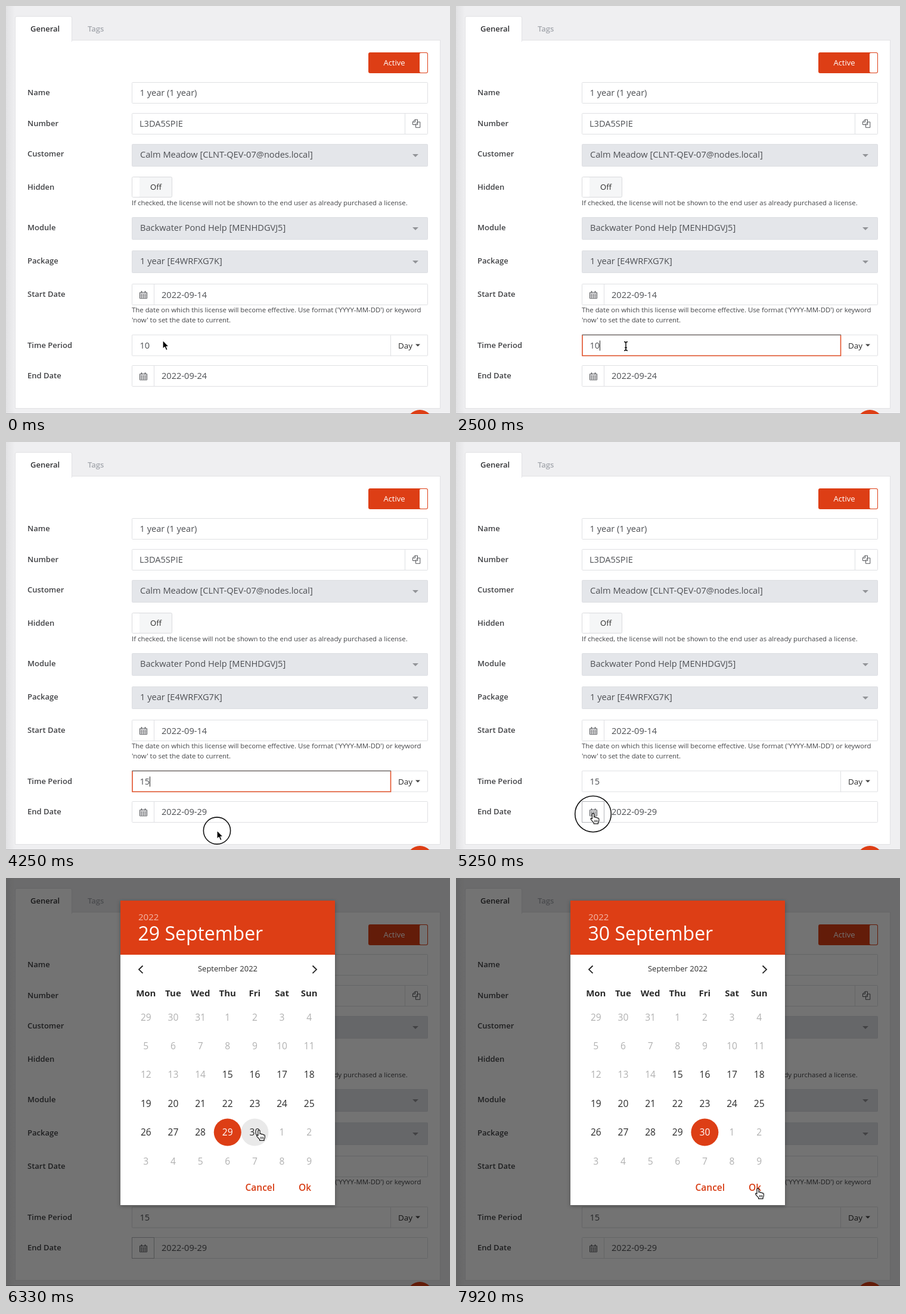
Recreate the animation shown at these times as an HTML page. Size 745 by 686 pixels, loop 8 s.

```html
<!DOCTYPE html>
<html lang="en">
<head>
<meta charset="utf-8">
<title>License form</title>
<style>
html, body { margin: 0; width: 100%; height: 100%; overflow: hidden; background: #efeff1; }
svg { display: block; width: 745px; height: 686px; }
text { font-family: "Open Sans", "Noto Sans", sans-serif; white-space: pre; }
.label { font-size: 13px; font-weight: 600; fill: #414245; }
.value { font-size: 14.6px; fill: #4d4f53; }
.help { font-size: 11.4px; fill: #444548; }
.small { font-size: 13px; fill: #2c2c2c; }
.week { font-size: 15px; font-weight: 700; fill: #2c2c2c; text-anchor: middle; }
.day { font-size: 15.6px; text-anchor: middle; }
.action { font-size: 15.5px; font-weight: 600; fill: #d73c14; }
.box { fill: #fff; stroke: #dfe0e3; }
.select { fill: #e4e6ea; stroke: #dcdee2; }
.line { fill: none; stroke: #dfe0e3; }
.dialog { filter: drop-shadow(0 2px 3px rgba(0, 0, 0, .3)); }
</style>
</head>
<body>
<svg id="stage" viewBox="0 0 745 686"></svg>
<script>
const ORANGE = '#dd3e15';
const LOOP = 8000, STEP = 250 / 3;

const text = (x, y, str, cls, extra = '') => `<text x="${x}" y="${y}" class="${cls}" ${extra}>${str}</text>`;
const rect = (x, y, w, h, attrs) => `<rect x="${x}" y="${y}" width="${w}" height="${h}" ${attrs}/>`;
const path = (d, attrs) => `<path d="${d}" ${attrs}/>`;
const at = (x, y, body, attrs = '') => `<g transform="translate(${x} ${y})" ${attrs}>${body}</g>`;
const label = (y, str) => text(36, y, str, 'label');
const field = (y, inner = '') => rect(211.5, y + .5, 496, 35, 'rx="1" class="box"') + inner;
const divider = (x, y) => path(`M${x} ${y + 1}v35`, 'class="line"');
const caret = (x, y, w, color) => path(`M${x - w / 2} ${y}h${w}l${-w / 2} ${w / 2}z`, `fill="${color}"`);
const select = (y, str) => rect(211.5, y + .5, 496, 37, 'rx="1" class="select"') +
  text(225, y + 23.4, str, 'value') + caret(687, y + 17, 10, '#929498');

const calendarIcon = (x, y) => at(x, y,
  path('M.5 3.200h12v10H.5z', '') +
  path('M.5 5.600h12M.5 8.100h12M.5 10.600h12M3.500 5.600v7.600M6.500 5.600v7.600M9.500 5.600v7.600', 'stroke-width=".7"') +
  path('M3.500 .800v3M9.500 .800v3', 'stroke-width="1.600"'), 'fill="none" stroke="#56585c"');
const copyIcon = at(682, 190.5,
  path('M4.5 .5h4v8.5h-8v-5zM4.5 .5v4h-4M8.5 4.5h4.3v9.3h-7.3v-4.8M8.5 4.8l-3 3.2', ''),
  'fill="none" stroke="#55575b" stroke-linejoin="round"');
const dateField = y => field(y, divider(248.5, y) + calendarIcon(224, y + 11.5));

const form = `
  <defs><linearGradient id="shade"><stop stop-color="#e2e2e4"/><stop offset="1" stop-color="#efeff1"/></linearGradient></defs>
  ${rect(0, 0, 745, 686, 'fill="#efeff1"')}${rect(0, 0, 15, 686, 'fill="url(#shade)"')}
  ${rect(15.5, 57.5, 713, 619, 'fill="#fff" stroke="#e2e2e5"')}
  ${path('M15.5 60V20q0-2.500 2.500-2.500h90q2.500 0 2.500 2.500V60', 'fill="#fff" stroke="#e2e2e5"')}
  ${rect(16, 56, 94, 6, 'fill="#fff"')}
  ${text(41, 42.7, 'General', 'label', 'style="fill:#303134"')}
  ${text(137, 42.7, 'Tags', 'label', 'style="fill:#a5a8ae"')}
  ${rect(608, 78, 100, 35, `rx="3" fill="${ORANGE}"`)}${rect(694, 79, 13, 33, 'rx="2" fill="#fff"')}
  ${text(651.5, 99.5, 'Active', 'small', 'text-anchor="middle" style="fill:#fff"')}
  ${label(150, 'Name')}${field(128)}${text(224.5, 151.3, '1 year (1 year)', 'value')}
  ${label(201.5, 'Number')}${field(180, divider(669.5, 180))}${text(224, 203.2, 'L3DA5SPIE', 'value')}${copyIcon}
  ${label(253, 'Customer')}${select(232, 'Calm Meadow [CLNT-QEV-07@nodes.local]')}
  ${label(309, 'Hidden')}
  ${rect(211.5, 287.5, 67, 34, 'rx="2" fill="#f5f6f7" stroke="#d9dadd"')}${rect(212, 288, 12, 33, 'rx="1.500" fill="#fff"')}
  ${text(251.5, 309, 'Off', 'small', 'text-anchor="middle"')}
  ${text(211, 335, 'If checked, the license will not be shown to the end user as already purchased a license.', 'help')}
  ${label(376.5, 'Module')}${select(355, 'Backwater Pond Help [MENHDGVJ5]')}
  ${label(432.5, 'Package')}${select(411, '1 year [E4WRFXG7K]')}
  ${label(488.5, 'Start Date')}${dateField(467)}${text(261, 490.5, '2022-09-14', 'value')}
  ${text(211, 515.3, "The date on which this license will become effective. Use format ('YYYY-MM-DD') or keyword", 'help')}
  ${text(211, 532.3, "'now' to set the date to current.", 'help')}
  ${label(574.5, 'Time Period')}${field(552.5, divider(645.5, 552.5))}
  ${text(658, 575.5, 'Day', 'small', 'style="font-size:13.500px"')}${caret(691, 568.5, 8, '#444')}
  <g id="focus" fill="none" stroke-width="1.6">${path('M212 553v35h433.500v-35', 'stroke="#e4532b"')}${path('M211.500 553h434.500', 'stroke="#77706e"')}</g>
  ${text(224.5, 575.8, '10', 'value', 'id="period"')}
  ${path('M241.500 562.500v17', 'id="caret" stroke="#222"')}
  ${label(626, 'End Date')}${dateField(604)}
  ${rect(211.5, 604.5, 37, 35, 'id="pressed" fill="none" stroke="#b4b6ba"')}
  ${text(261, 627.4, '2022-09-24', 'value', 'id="endDate"')}
  ${rect(0, 685, 745, 1, 'fill="#b9b9bb"')}
  <circle cx="694.5" cy="701" r="22" fill="${ORANGE}"/>`;

const colX = i => 234.8 + 45.65 * (i % 7);
const rowY = i => 234 + 48.4 * Math.floor(i / 7);
const FIRST = 2;             // grid offset: the cell of day n is n + 2
const dayNumber = i => i < 3 ? 29 + i : i < 33 ? i - FIRST : i - 32;
const dayColor = i => i >= 17 && i < 33 ? '#2c2c2c' : '#b1b1b1';
const days = Array.from({ length: 42 }, (_, i) =>
  text(colX(i), rowY(i) + 5.6, dayNumber(i), 'day', `id="day${i}" fill="${dayColor(i)}"`)).join('');
const weekdays = 'Mon Tue Wed Thu Fri Sat Sun'.split(' ')
  .map((d, i) => text(colX(i), 198.8, d, 'week')).join('');
const spot = (id, color) => `<circle id="${id}" r="23" cx="${colX(32)}" cy="427.500" fill="${color}"/>`;

const picker = `<g id="picker">
  ${rect(0, 0, 745, 686, 'fill="#000" opacity=".55"')}
  ${rect(192, 38, 360, 512, 'fill="#fff" class="dialog"')}${rect(192, 38, 360, 91, `fill="${ORANGE}"`)}
  ${text(222, 71, '2022', 'day', 'style="font-size:15px;text-anchor:start" fill="#f3b9a9"')}
  ${text(221.5, 105, '29 September', 'title', 'id="title" font-size="32" fill="#fff"')}
  ${text(372, 157.2, 'September 2022', 'small', 'text-anchor="middle"')}
  ${path('M229.500 147.500l-6.500 6.300 6.500 6.300M514.500 147.500l6.500 6.300-6.500 6.300', 'fill="none" stroke="#222" stroke-width="1.8"')}
  ${weekdays}${spot('hover', '#e9e9e9')}${spot('chosen', ORANGE)}${days}
  ${text(401.5, 526.4, 'Cancel', 'action')}${text(491, 526.4, 'Ok', 'action')}
</g>`;

const pointers = `
  <circle id="ring" fill="none" stroke="#111" stroke-width="1.6"/>
  <g id="pointer" stroke-linejoin="round">
    <g id="arrow">${path('M0 0V14.500L3.300 11.400 5.600 16.800 8.200 15.700 6 10.500H10.300Z', 'fill="#000" stroke="#fff" stroke-width="1.2"')}</g>
    <g id="beam" fill="none">${[['#fff', 3], ['#111', 1.5]].map(([color, width]) =>
      path('M-3-7.500q3 0 3 2.500q0-2.500 3-2.500M0-5V5M-3 7.500q3 0 3-2.500q0 2.500 3 2.500M-2 2.500h4', `stroke="${color}" stroke-width="${width}"`)).join('')}</g>
    <g id="hand" transform="scale(.92)">${path('M-1.700 1.200Q-1.700-.7 0-.7T1.700 1V6.500Q2.200 5.500 3.600 5.800 4.700 6 4.800 7.200 7.300 6 7.800 8.200 10.600 7.400 10.700 10V12.500Q10.600 14.500 9.300 16V18.300H1.200V16.500Q-1 14-3.200 11.500-4.900 9.300-3.900 8.400-2.900 7.600-1.700 9.400Z', 'fill="#fff" stroke="#111" stroke-width="1.3"')}
      ${path('M3 11.500v4M5.300 11.500v4M7.600 11.500v4', 'stroke="#111"')}</g>
  </g>`;

document.getElementById('stage').innerHTML = form + picker + pointers;
const el = id => document.getElementById(id);
const show = (id, on) => el(id).setAttribute('visibility', on ? 'visible' : 'hidden');
const set = (id, attrs) => { for (const k in attrs) el(id).setAttribute(k, attrs[k]); };

// [time, x, y]
const route = [[0, 263, 562], [330, 263, 562], [600, 285, 572], [3330, 285, 572], [4000, 354, 653],
  [4450, 354, 653], [4950, 230, 625], [5600, 230, 625], [6250, 424.5, 424.5], [7050, 424.5, 424.5],
  [7850, 506.5, 522.5], [LOOP, 506.5, 522.5]];
// [time, value], each held until the next
const shapes = [[0, 'arrow'], [410, 'beam'], [3650, 'arrow'], [4900, 'hand'], [5330, 'arrow'], [6080, 'hand']];
const periods = [[0, '10'], [2660, '1'], [2910, '15']];
const endDates = [[0, '24'], [2660, '15'], [2910, '29']];
const clicks = [1910, 4160, 5080, 6660];
const FOCUS = 2010, TYPED = 3050, BLUR = 4330, OPEN = 5330, PICK = 6830;

const held = (table, t) => table.filter(row => row[0] <= t).pop()[1];
const ease = p => p * p * (3 - 2 * p);

function position(t) {
  const i = Math.max(1, route.findIndex(row => row[0] > t));
  const [t0, x0, y0] = route[i - 1], [t1, x1, y1] = route[i];
  const p = ease((t - t0) / (t1 - t0));
  return [x0 + (x1 - x0) * p, y0 + (y1 - y0) * p];
}

function draw(t) {
  const [x, y] = position(t);
  set('pointer', { transform: `translate(${x} ${y})` });
  const shape = held(shapes, t);
  for (const id of ['arrow', 'beam', 'hand']) show(id, id === shape);

  const age = Math.min(...clicks.map(c => t - c).filter(a => a >= 0));
  show('ring', age < 220);
  if (age < 220) set('ring', { cx: x, cy: y + .5, r: 14 + age * .096 });

  const focused = t >= FOCUS && t < BLUR;
  const blink = (t - (t < 2600 ? FOCUS : TYPED)) % 1000;
  show('focus', focused);
  show('caret', focused && blink < 500);
  const period = held(periods, t);
  el('period').textContent = period;
  set('caret', { transform: `translate(${(period.length - 2) * 8.3} 0)` });
  el('endDate').textContent = '2022-09-' + held(endDates, t);
  show('pressed', t >= 5080 && t < 6660);

  const day = t < PICK ? 29 : 30;
  show('picker', t >= OPEN);
  show('hover', t >= 6160 && t < PICK);
  el('title').textContent = day + ' September';
  set('chosen', { cx: colX(day + FIRST) });
  for (const n of [29, 30]) set('day' + (n + FIRST), { fill: n === day ? '#fff' : '#2c2c2c' });
}

const start = performance.now();
function tick() {
  const t = (performance.now() - start) % LOOP;
  draw(Math.min(Math.floor((t + 5) / STEP) * STEP, LOOP - STEP));
  requestAnimationFrame(tick);
}
tick();
</script>
</body>
</html>
```
